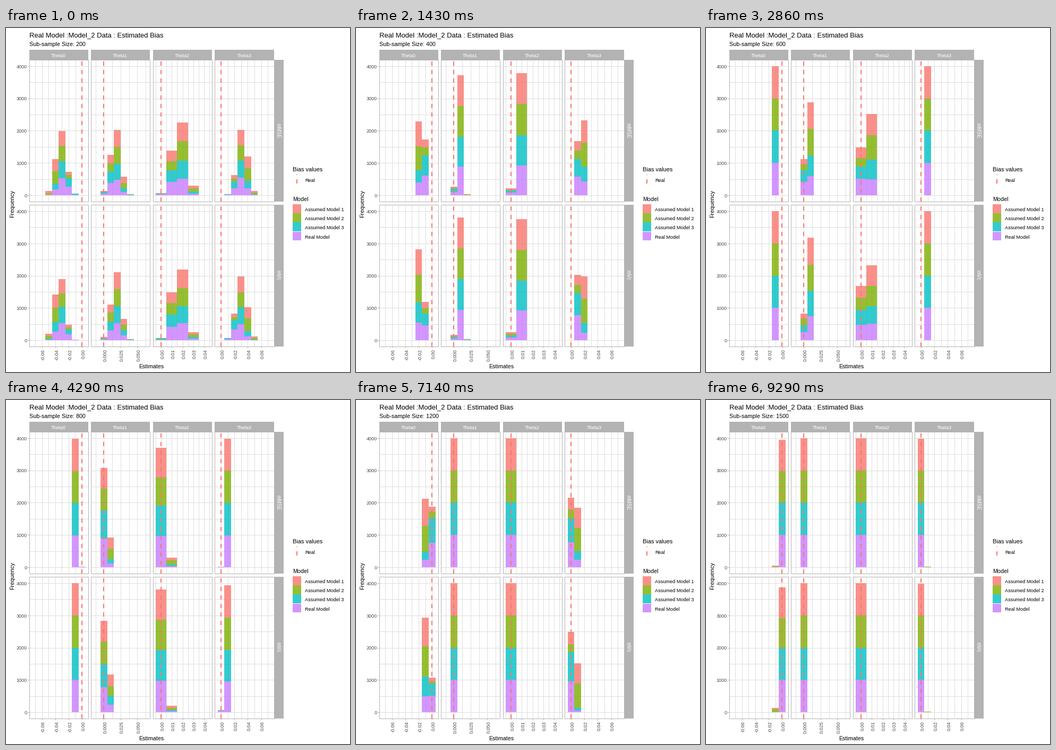
A matplotlib script for the animation above (10000 ms loop, 648 px wide and 648 px high).

```python
import math

import numpy as np
import matplotlib.pyplot as plt
from matplotlib.animation import FuncAnimation
from matplotlib.collections import PolyCollection
from matplotlib.colors import to_rgba

plt.rcParams["font.family"] = "Liberation Sans"

SIZE = 648
LOOP, TICK_MS = 10000, 50
STEPS = 14
GREY, GRID, LABEL = "#B3B3B3", "#DEDEDE", "#4D4D4D"
RED = "#F8766D"
FILLS = [to_rgba(c, 0.8) for c in (RED, "#7CAE00", "#00BFC4", "#C77CFF")]
MODELS = ["Assumed Model 1", "Assumed Model 2", "Assumed Model 3", "Real Model"]

# Panel: left, right, x of zero, pixels per 0.01, tick step, first and last tick, label format
COLS = [
    (44, 155, 143.75, 12.6, 2, -3, 0, "%.2f"),
    (160, 271, 184.8, 12.6, 2.5, 0, 2, "%.3f"),
    (277, 388, 292.6, 20.2, 1, 0, 4, "%.2f"),
    (393, 505, 405.4, 12.6, 2, 0, 3, "%.2f"),
]
ROWS = [(60, 327, 315.4, "mMSE"), (333, 600, 588.5, "mVc")]
UNIT = 0.06075  # pixels per count

# Estimates are normal: bias falls as n ** -decay, spread as n ** -1.5 (units of 0.01)
DECAY = (1.02, 1.02, 1.05, 1.04)
SPREAD = (0.69, 0.68, 0.55, 0.68)
BIAS = [  # at n = 200, per row, panel and model
    [(-3.4, -3.36, -2.9, -2.9), (1.92, 1.9, 1.67, 1.63),
     (1.72, 1.81, 1.68, 1.58), (3.33, 3.4, 3.03, 3.0)],
    [(-3.46, -3.55, -3.2, -3.1), (1.93, 1.87, 1.85, 1.8),
     (1.71, 1.69, 1.62, 1.6), (3.32, 3.43, 2.82, 2.72)],
]
BINS = np.arange(-7, 8)
EDGES = np.arange(-7, 9) - 0.5
erf = np.vectorize(math.erf)


def histogram(n, row, col):
    """Counts out of 1000 per model, one line per bin."""
    mean = np.array(BIAS[row][col])[:, None] * (200 / n) ** DECAY[col]
    sd = SPREAD[col] * (200 / n) ** 1.5
    cdf = 0.5 + 0.5 * erf((EDGES - mean) / (sd * math.sqrt(2)))
    return np.rint(1000 * np.diff(cdf)).T


fig = plt.figure(figsize=(SIZE / 100, SIZE / 100), dpi=100, facecolor="white")
ax = fig.add_axes([0, 0, 1, 1])
ax.set_xlim(0, SIZE)
ax.set_ylim(SIZE, 0)
ax.axis("off")
layers = {}


def box(x0, y0, x1, y1):
    x0, y0, x1, y1 = (math.floor(v) for v in (x0, y0, x1, y1))
    return [(x0, y0), (x1, y0), (x1, y1), (x0, y1)]


def rect(x0, y0, x1, y1, color, z):
    layers.setdefault(z, []).append((box(x0, y0, x1, y1), to_rgba(color)))


def hline(x0, x1, y, color, z):
    y = math.floor(y)
    rect(x0, y, x1, y + 1, color, z)


def vline(x, y0, y1, color, z):
    x = math.floor(x)
    rect(x, y0, x + 1, y1, color, z)


def text(x, y, s, px, color="black", ha="left", va="baseline", rot=0):
    return ax.text(x, y, s, fontsize=px * 0.72, color=color, ha=ha, va=va,
                   rotation=rot, zorder=9)


def draw_panel(row, col):
    left, right, zero, px, step = COLS[col][:5]
    top, bottom, base, _ = ROWS[row]
    for half in range(-10, 11):
        x = zero + half * step / 2 * px
        if left + 1 < x < right - 1:
            vline(x, top, bottom, GRID, 1)
    for c in range(0, 4001, 500):
        hline(left, right, base - c * UNIT, GRID, 1)
    for y in range(bottom, top, -16):
        rect(zero - 1, max(y - 8, top), zero + 1, y, RED, 4)
    for y in (top, bottom):
        hline(left, right + 1, y, GREY, 5)
    for x in (left, right):
        vline(x, top, bottom, GREY, 5)


for row, (top, bottom, base, name) in enumerate(ROWS):
    for col in range(4):
        draw_panel(row, col)
    for c in range(0, 4001, 1000):
        hline(41, 44, base - c * UNIT, GREY, 5)
        text(39.5, base - c * UNIT + 0.8, str(c), 9, LABEL, "right", "center")
    rect(505, top, 523, bottom, GREY, 6)
    text(512, (top + bottom) / 2 - 0.5, name, 9.7, "white", "center", "center", 270)

for col, (left, right, zero, px, step, first, last, fmt) in enumerate(COLS):
    rect(left, 41, right, 61, GREY, 6)
    text((left + right) / 2 - 0.5, 54.8, f"Theta{col}", 9, "white", "center")
    for i in range(first, last + 1):
        x = zero + i * step * px
        vline(x, 600, 603, GREY, 5)
        text(x + 2.3, 605.5, fmt % (i * step / 100), 9.2, LABEL, "center", "top", 90)

text(44, 17, "Real Model :Model_2 Data : Estimated Bias", 13.05)
subtitle = text(44, 34, "", 10.75)
text(12, 331, "Frequency", 11, ha="center", va="center", rot=90)
text(274, 641, "Estimates", 10.6, ha="center")

text(540, 270, "Bias values", 11)
rect(547, 276, 549, 277, RED, 4)
rect(547, 285, 549, 293, RED, 4)
text(563, 290, "Real", 9.2)
text(540, 326, "Model", 10.8)
for i, (name, fill) in enumerate(zip(MODELS, FILLS)):
    y = 332.4 + 17.28 * i
    rect(540, y, 556, y + 16.7, fill, 3)
    text(563, round(y + 12.5), name, 9.2)

for z, shapes in layers.items():
    verts, colors = zip(*shapes)
    ax.add_collection(PolyCollection(verts, facecolors=colors, linewidths=0, zorder=z),
                      autolim=False)
bars = PolyCollection([], linewidths=0, zorder=3)
ax.add_collection(bars, autolim=False)


def stack(n, row, col):
    zero, px = COLS[col][2:4]
    base = ROWS[row][2]
    for b, counts in zip(BINS, histogram(n, row, col)):
        y = base
        for m in (3, 2, 1, 0):
            y0 = y - counts[m] * UNIT
            if math.floor(y0) < math.floor(y):
                yield box(zero + (b - 0.5) * px, y0, zero + (b + 0.5) * px, y), FILLS[m]
            y = y0


def update(i):
    # the sample grows in hard steps, 14 per loop
    step = int((i * TICK_MS + TICK_MS - 1) * STEPS / LOOP)
    n = 200 + 100 * step
    subtitle.set_text(f"Sub-sample Size: {n}")
    parts = [p for row in range(2) for col in range(4) for p in stack(n, row, col)]
    verts, colors = zip(*parts)
    bars.set_verts(verts)
    bars.set_facecolor(colors)
    return bars, subtitle


anim = FuncAnimation(fig, update, frames=LOOP // TICK_MS, interval=TICK_MS,
                     repeat=True, repeat_delay=0, blit=False)
plt.show()
```
